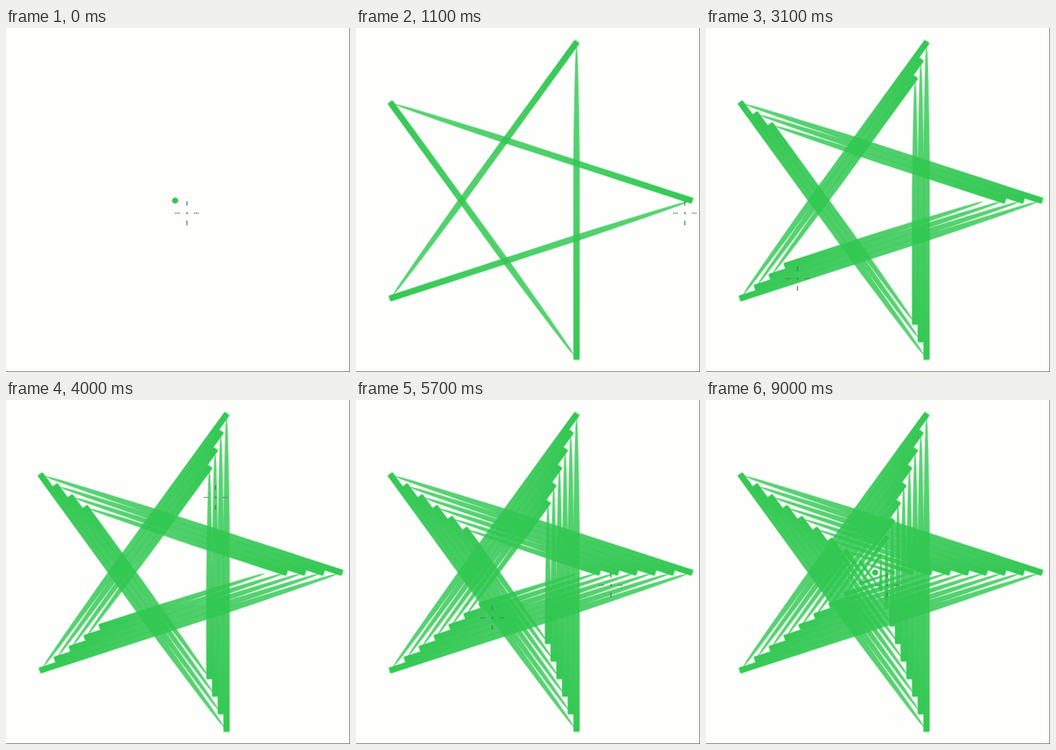
An HTML page with a canvas for the animation above (9100 ms loop, 600x600 px).

```html
<!DOCTYPE html>
<html lang="en">
<head>
<meta charset="utf-8">
<title>Nested stars</title>
<style>
  html, body { margin: 0; width: 100%; height: 100%; overflow: hidden; background: #fefefd; }
  canvas { display: block; }
</style>
</head>
<body>
<canvas id="stage" width="600" height="600"></canvas>
<script>
const ctx = document.getElementById('stage').getContext('2d');
const LOOP = 9100, STEP = 100;
const CX = 295, CY = 301, RADIUS = 290, STARS = 9;
const BRUSH = 11, RAMP = 200;
const GREEN = '48,199,80';

// Start time of each star; the last entry is the return to the centre.
const starts = [100, 1050, 1930, 2830, 3705, 4590, 5460, 6240, 7020, 7760];

const clamp = x => Math.max(0, Math.min(1, x));

function vertex(star, i) {
  const r = RADIUS * (1 - star / STARS);
  const a = i * Math.PI * 1.2;
  return [CX + r * Math.cos(a), CY - r * Math.sin(a)];
}

// The brush swells with the distance drawn until it reaches full width.
const widthAt = d => BRUSH * Math.sqrt(clamp(d / RAMP));

function taper(end, grow, tip) {
  const n = 32, first = 4;
  const at = i => first + (end - first) * i / n;
  const half = i => Math.max(0.3, widthAt(at(i)) / 2 + grow);
  ctx.beginPath();
  ctx.moveTo(first, 0);
  for (let i = 1; i <= n; i++) ctx.lineTo(at(i), -half(i));
  const h = half(n), round = Math.min(2.5, h);
  ctx.lineTo(end + tip - round, -h);
  ctx.quadraticCurveTo(end + tip, -h, end + tip, -h + round);
  ctx.lineTo(end + tip, h - round);
  ctx.quadraticCurveTo(end + tip, h, end + tip - round, h);
  for (let i = n; i >= 1; i--) ctx.lineTo(at(i), half(i));
  ctx.closePath();
  ctx.fill();
}

function stroke(from, to, part) {
  const dx = to[0] - from[0], dy = to[1] - from[1];
  const len = Math.hypot(dx, dy), end = Math.max(5, len * part);
  ctx.save();
  ctx.translate(from[0], from[1]);
  ctx.rotate(Math.atan2(dy, dx));
  const ink = ctx.createLinearGradient(0, 0, len, 0);
  ink.addColorStop(0, `rgba(${GREEN},0.72)`);
  ink.addColorStop(0.5, `rgba(${GREEN},0.8)`);
  ink.addColorStop(1, `rgba(${GREEN},0.97)`);
  ctx.fillStyle = `rgba(${GREEN},0.24)`;
  taper(end, 1, 4);
  ctx.fillStyle = ink;
  taper(end, -0.3, 1.8);
  ctx.restore();
}

function dot([x, y]) {
  ctx.fillStyle = `rgba(${GREEN},0.25)`;
  ctx.beginPath();
  ctx.arc(x, y, 6, 0, 7);
  ctx.fill();
  ctx.fillStyle = `rgb(${GREEN})`;
  ctx.beginPath();
  ctx.arc(x, y, 5.1, 0, 7);
  ctx.fill();
}

function crosshair([px, py]) {
  const x = Math.round(px + 20), y = Math.round(py + 22);
  ctx.globalAlpha = 0.85;
  ctx.fillStyle = '#4f7468';
  ctx.fillRect(x - 0.5, y - 21, 2, 8);
  ctx.fillRect(x - 0.5, y + 13, 2, 8);
  ctx.fillStyle = '#5c6f69';
  for (let i = 0; i < 3; i++) {
    ctx.fillRect(x - 20 + i * 3, y - 1, 2, 2);
    ctx.fillRect(x + 13 + i * 3, y - 1, 2, 2);
  }
  ctx.fillRect(x - 1, y - 0.5, 4, 1);
  ctx.fillRect(x, y - 2, 1.5, 4);
  ctx.globalAlpha = 1;
}

function draw(t) {
  ctx.fillStyle = '#fefefd';
  ctx.fillRect(0, 0, 600, 600);

  let pen = [CX, CY], pointer = pen;
  for (let k = 0; k < STARS && t >= starts[k]; k++) {
    // Six slots per star: hop to the first tip, then five edges.
    const slot = (t - starts[k]) / ((starts[k + 1] - starts[k]) / 6);
    pointer = vertex(k, 0);
    for (let e = 1; e <= 5 && slot >= e; e++) {
      const a = vertex(k, e - 1), b = vertex(k, e);
      const part = clamp((slot - e - 0.1) / 0.5);
      pointer = b;
      if (part > 0) {
        stroke(a, b, part);
        pen = [a[0] + (b[0] - a[0]) * part, a[1] + (b[1] - a[1]) * part];
      }
    }
  }
  const home = t >= starts[STARS];
  if (home) pen = pointer = [CX, CY];

  // The brush tip only shows on its own at rest in the centre or mid-edge.
  if (home || t < starts[1]) dot(pen);
  // The pointer lingers on the sixth star's tip for a moment.
  if (t >= starts[6] && t <= 6000) crosshair(vertex(5, 0));
  crosshair(pointer);

  ctx.fillStyle = '#5a5c5c';
  ctx.fillRect(599, 0, 1, 600);
  ctx.fillRect(0, 599, 600, 1);
}

const begin = performance.now();
function tick() {
  const t = (performance.now() - begin) % LOOP;
  draw(Math.floor(t / STEP) * STEP);
  requestAnimationFrame(tick);
}
tick();
</script>
</body>
</html>
```
